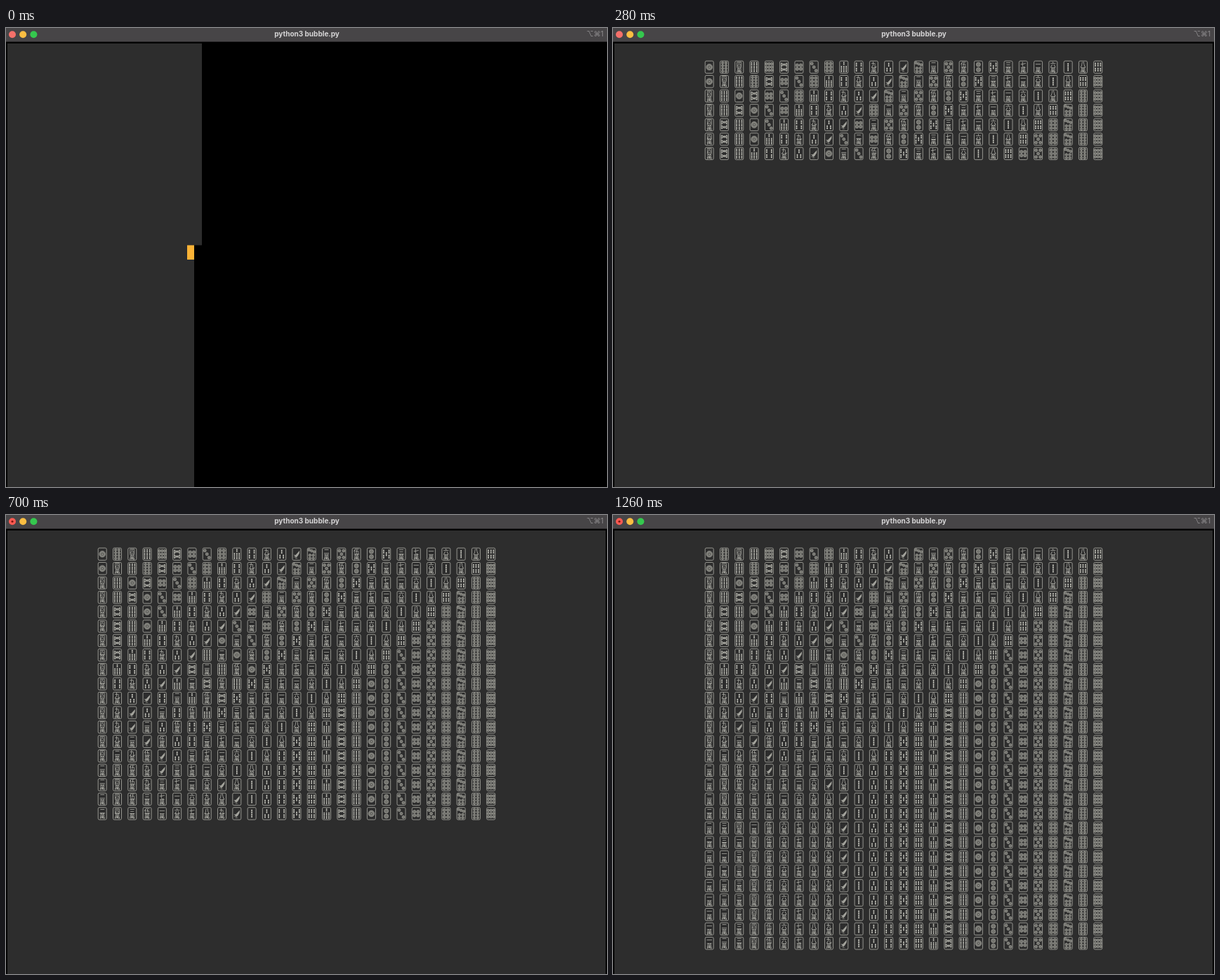
Write an HTML page with a canvas that moves like this. It is 856 by 654 pixels and loops after 1.33 s.

```html
<!DOCTYPE html>
<html lang="zh-Hant">
<meta charset="utf-8">
<title>Bubble sort</title>
<style>
  html, body { margin: 0; width: 100%; height: 100%; overflow: hidden; background: #000; }
  canvas { display: block; }
</style>
<canvas id="stage" width="856" height="654"></canvas>
<script>
const ctx = document.getElementById('stage').getContext('2d');
const STEP = 70, STEPS = 19;
const PANEL = '#2d2d2d', INK = '#c4c4bc', LINE = '#a2a29b';

// 0-8 characters, 9-17 bamboo, 18-26 circles
const shuffled = [18, 25, 3, 17, 26, 16, 21, 20, 23, 15, 12, 8, 11, 9,
  24, 1, 22, 4, 19, 13, 2, 6, 0, 5, 10, 7, 14];
const rowsShown = [0, 0, 2, 4, 7, 9, 11, 12, 14, 16, 19, 20, 22, 23, 25, 27, 28, 28, 28];

function bubblePasses(start) {
  const rows = [start];
  for (let pass = 0; pass < start.length; pass++) {
    const row = [...rows[pass]];
    for (let i = 0; i + 1 < row.length; i++)
      if (row[i] > row[i + 1]) [row[i], row[i + 1]] = [row[i + 1], row[i]];
    rows.push(row);
  }
  return rows;
}
const rows = bubblePasses(shuffled);

const grid = (xs, ys) => ys.flatMap(y => xs.map(x => [x, y]));

const circles = [
  [[0, 0]],
  grid([0], [-3.7, 3.7]),
  [[-3, -5], [0, 0], [3, 5]],
  grid([-2.6, 2.6], [-2.6, 2.6]),
  [...grid([-3, 3], [-4.8, 4.8]), [0, 0]],
  grid([-2.6, 2.6], [-5, 0, 5]),
  [[-3.7, -6], [0, -4.6], [3.7, -3.2], ...grid([-2.4, 2.4], [1.6, 6])],
  grid([-2.4, 2.4], [-6, -2, 2, 6]),
  grid([-3.8, 0, 3.8], [-4.6, 0, 4.6]),
];
const circleSize = [4.3, 3, 2, 2.2, 2, 2.1, 1.8, 1.7, 1.8];

const bamboo = [
  [],
  grid([0], [-3, 3]),
  [[0, -3.4], ...grid([-2.4, 2.4], [3.6])],
  grid([-3.4, 3.4], [-3.6, 3.6]),
  [...grid([-3.8, 3.8], [-3.6, 3.6]), [0, 0]],
  grid([-3.6, 0, 3.6], [-3.6, 3.6]),
  [[0, -5.2], ...grid([-3.4, 0, 3.4], [0.4, 5.2])],
  [],
  grid([-3.6, 0, 3.6], [-5, 0, 5]),
];

function disc(x, y, r, fill) {
  ctx.beginPath();
  ctx.arc(x, y, r, 0, 7);
  ctx.fillStyle = fill;
  ctx.fill();
}

function text(label, x, y, font, fill, align = 'center') {
  ctx.font = font;
  ctx.fillStyle = fill;
  ctx.textAlign = align;
  ctx.fillText(label, x, y);
}

function drawCircles(n) {
  const r = circleSize[n];
  ctx.lineWidth = 0.7;
  for (const [x, y] of circles[n]) {
    disc(x, y, r, '#74746f');
    ctx.stroke();
    if (n === 0) {
      disc(x, y, 2.5, '#4a4a47');
      ctx.stroke();
      disc(x, y, 1, LINE);
    }
  }
}

function drawBamboo(n) {
  if (n === 0) { // bird
    ctx.fillStyle = LINE;
    ctx.fill(new Path2D('M-4.5 1L-1.5 1.2L4.2 -5L3.8 -1L1 3.5L-1.5 5.2L-2 3Z'));
    ctx.lineWidth = 0.7;
    ctx.stroke(new Path2D('M-4 4.5L-1 3M-2 6H1'));
  } else if (n === 7) { // slanted sticks
    ctx.lineWidth = 1.3;
    ctx.stroke(new Path2D('M-4 -6V-1L0 -4.5L4 -1V-6M-4 6V1L0 4.5L4 1V6M-4 -6L0 -2.5L4 -6M-4 6L0 2.5L4 6'));
  } else {
    const half = n > 7 || n === 6 ? 2.1 : 2.7;
    ctx.fillStyle = INK;
    for (const [x, y] of bamboo[n]) {
      ctx.fillRect(x - 0.8, y - half, 1.6, half - 0.3);
      ctx.fillRect(x - 0.8, y + 0.3, 1.6, half - 0.3);
      ctx.fillRect(x - 0.4, y - 0.3, 0.8, 0.6);
    }
  }
}

function drawCharacter(n) {
  const font = '500 8px "Noto Sans CJK TC", "Noto Sans CJK SC", "Noto Sans CJK JP", sans-serif';
  text('一二三四伍六七八九'[n], 0, -0.9, font, INK);
  text('萬', 0, 6.9, font, INK);
}

function drawTile(tile, x, y) {
  ctx.save();
  ctx.translate(x, y);
  ctx.strokeStyle = LINE;
  ctx.lineWidth = 0.9;
  ctx.beginPath();
  ctx.roundRect(-6, -8.7, 12, 17.4, 1.8);
  ctx.stroke();
  [drawCharacter, drawBamboo, drawCircles][Math.floor(tile / 9)](tile % 9);
  ctx.restore();
}

function drawTitleBar(step) {
  ctx.fillStyle = '#474547';
  ctx.fillRect(0, 0, 856, 19.6);
  const edited = step > 5;
  disc(9, 9.2, 5, edited ? '#fb5a52' : '#f5706a');
  if (edited) disc(9, 9.2, 1.5, '#7d1510');
  disc(24.2, 9.2, 5, '#fbbe42');
  disc(39.4, 9.2, 5, '#35c84e');
  text('python3 bubble.py', 428.5, 12.4, '700 10px Inter, sans-serif', '#d6d5d6');
  text('⌥⌘1', 851, 11.8, '10px Inter, "DejaVu Sans", sans-serif', '#8f8d8f', 'right');
}

function draw(step) {
  ctx.fillStyle = '#000';
  ctx.fillRect(0, 0, 856, 654);
  drawTitleBar(step);
  ctx.fillStyle = PANEL;
  if (step === 0) {
    ctx.fillRect(2, 22, 277, 287.5);
    ctx.fillRect(2, 309, 266, 345);
    ctx.fillStyle = '#fbb336';
    ctx.fillRect(258, 309.5, 10, 20.5);
    return;
  }
  ctx.fillRect(2, 22, 852, 632);
  rows.slice(0, rowsShown[step]).forEach((row, r) =>
    row.forEach((tile, c) => drawTile(tile, 137.2 + c * 21.29, 55.7 + r * 20.54)));
}

let drawn = -1;
function tick() {
  const step = Math.floor(performance.now() / STEP) % STEPS;
  if (step !== drawn) draw(drawn = step);
  requestAnimationFrame(tick);
}
tick();
</script>
</html>
```
